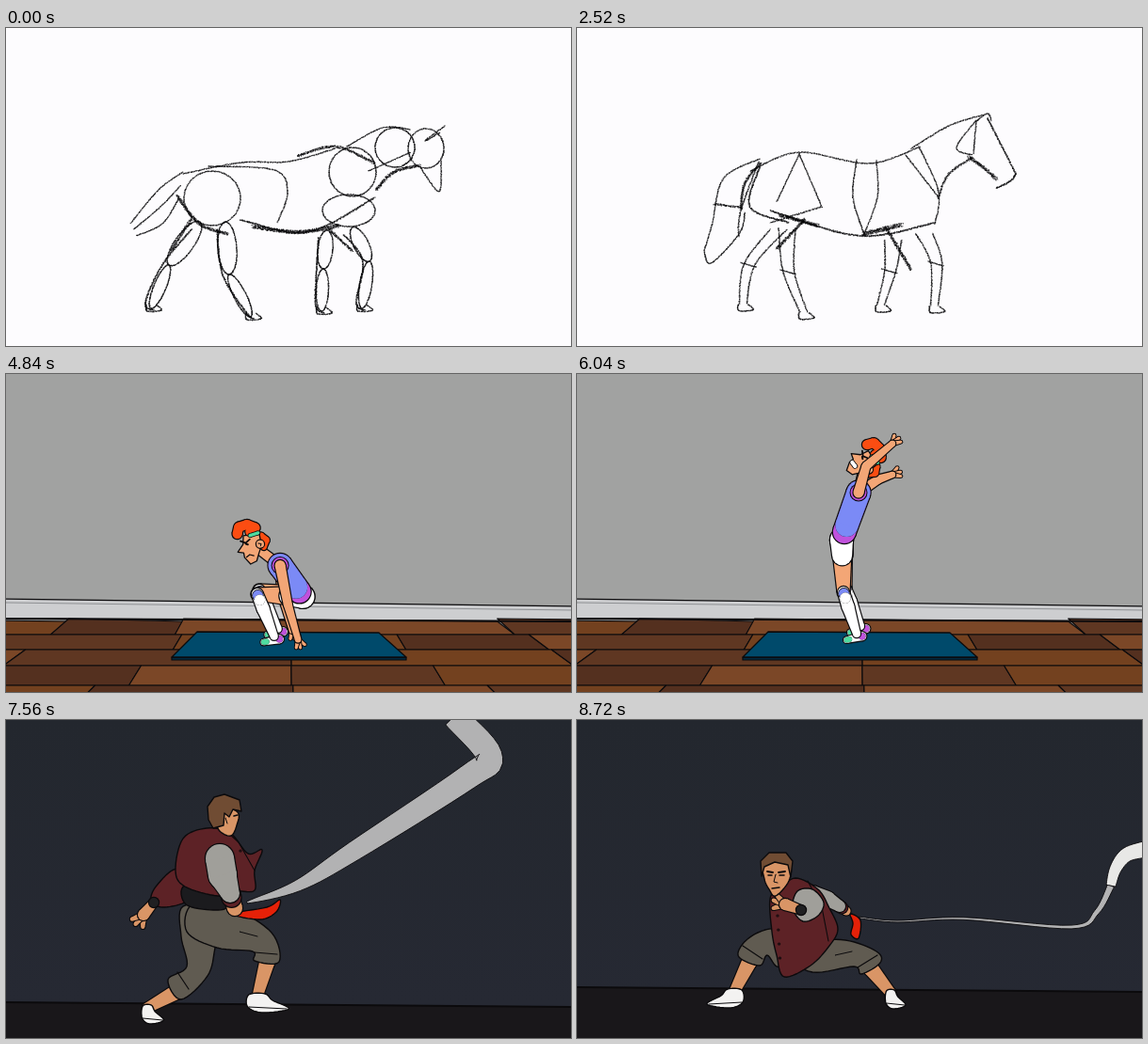
These frames come from a looping animation (600x338 px, 8760 ms). An HTML page with a canvas:

```html
<!DOCTYPE html>
<html lang="en">
<head>
<meta charset="utf-8">
<title>Animation reel</title>
<style>
html, body { margin: 0; width: 100%; height: 100%; overflow: hidden; background: #fdfcfe; }
canvas { display: block; width: 100%; height: 100%; }
</style>
</head>
<body>
<canvas id="stage" width="600" height="338"></canvas>
<script>
const ctx = document.getElementById('stage').getContext('2d');
const LOOP = 8760, YOGA_START = 2800, FIGHT_START = 6600;
const INK = '#0b0a0c';
const lerp = (a, b, s) => a + (b - a) * s;
const clamp = (v, lo = 0, hi = 1) => Math.max(lo, Math.min(hi, v));
const ease = s => (s = clamp(s), s * s * (3 - 2 * s));
const mix = (a, b, s) => a.map((v, i) => lerp(v, b[i], s));
const pairs = flat => flat.reduce((out, v, i) => (i % 2 ? out[out.length - 1].push(v) : out.push([v]), out), []);

function random(seed) {
  let s = seed * 7919 + 17;
  return () => (s = (s * 16807 + 11) % 2147483647) / 2147483647;
}

// Catmull-Rom samples through the given points.
function spline(p, closed, n = 8) {
  const m = p.length, out = [];
  const at = i => p[closed ? (i + m) % m : clamp(i, 0, m - 1)];
  for (let i = 0; i < (closed ? m : m - 1); i++) {
    const [a, b, c, d] = [at(i - 1), at(i), at(i + 1), at(i + 2)];
    for (let j = 0; j < n; j++) {
      const s = j / n;
      out.push([0, 1].map(k => b[k] + .5 * s * (c[k] - a[k] + s * (2 * a[k] - 5 * b[k] + 4 * c[k] - d[k] + s * (3 * (b[k] - c[k]) + d[k] - a[k])))));
    }
  }
  out.push(closed ? p[0] : p[m - 1]);
  return out;
}

function trace(points) {
  ctx.beginPath();
  points.forEach(p => ctx.lineTo(...p));
}

function shape(flat, fill, width = 1.4, curved = true) {
  const p = pairs(flat);
  trace(curved ? spline(p, true) : p);
  ctx.closePath();
  ctx.fillStyle = fill;
  ctx.fill();
  line(null, INK, width);
}

function line(flat, color = INK, width = 1.3) {
  if (flat) trace(pairs(flat));
  ctx.strokeStyle = color;
  ctx.lineWidth = width;
  ctx.stroke();
}

// A tapered, outlined chain of rounded segments.
function limb(points, radii, color, outline = 1.2) {
  for (const [fill, grow] of [[INK, outline], [color, 0]]) {
    ctx.fillStyle = fill;
    points.forEach(([x, y], i) => {
      const r = radii[i] + grow;
      ctx.beginPath();
      ctx.arc(x, y, r, 0, 7);
      ctx.fill();
      if (!i) return;
      const [px, py] = points[i - 1], pr = radii[i - 1] + grow;
      const a = Math.atan2(y - py, x - px), nx = -Math.sin(a), ny = Math.cos(a);
      trace([[px + nx * pr, py + ny * pr], [x + nx * r, y + ny * r], [x - nx * r, y - ny * r], [px - nx * pr, py - ny * pr]]);
      ctx.fill();
    });
  }
}

function hand(from, at, size, color) {
  const a = Math.atan2(at[1] - from[1], at[0] - from[0]);
  for (const turn of [-.65, 0, .5]) {
    limb([at, [at[0] + Math.cos(a + turn) * size, at[1] + Math.sin(a + turn) * size]], [size * .28, size * .16], color, 1);
  }
}

// ---- Horse: each stroke is [weight, x, y, ...] ----
const ROUGH = [
  [1, 188,155, 250,143, 300,142, 350,128],
  [1, 215,147, 285,151, 299,175, 288,207],
  [2.4, 310,136, 350,126, 392,144],
  [1.5, 249,204, 320,217, 392,180],
  [3.8, 262,211, 310,217, 354,210],
  [.8, 362,126, 400,106, 430,108],
  [1, 440,148, 460,174, 462,141],
  [1, 466,104, 445,120, 461,111],
  [2.8, 393,172, 412,153, 440,146],
  [.7, 385,152, 430,132],
  [2.8, 182,178, 205,208, 236,219],
  [2.6, 197,203, 175,237],
  [2.4, 343,214, 368,237]
];
const ROUNDS = [[219,181,30,29], [368,153,25,26], [446,128,19,21], [364,194,28,17], [413,127,21,21]];
const FRONT = [
  [1.1, 355,128, 395,104, 432,92],
  [1.4, 436,96, 466,155],
  [1.4, 466,155, 460,163, 445,170],
  [3, 416,137, 430,147, 446,161],
  [.8, 424,98, 403,127, 420,135],
  [1, 424,99, 421,134],
  [1.1, 424,99, 436,91, 440,99],
  [2, 420,138, 395,155, 383,181],
  [1, 349,135, 384,180],
  [1, 363,126, 384,174, 380,209],
  [4.2, 304,219, 345,209],
  [2.8, 328,212, 355,257]
];
const REAR = [
  [1.1, 185,152, 235,132, 310,144, 365,126],
  [1, 297,140, 293,180, 305,219],
  [1, 318,141, 319,180, 304,221],
  [1.4, 194,148, 184,190, 225,207],
  [2.2, 195,144, 179,165, 175,194],
  [.8, 236,134, 212,185],
  [.8, 236,134, 260,190],
  [1.3, 260,190, 205,207],
  [1.5, 205,194, 300,221, 380,207],
  [3.4, 216,199, 256,210],
  [2.8, 242,203, 212,235]
];
const TAIL = [
  [.9, 194,139, 158,160, 147,208, 139,237],
  [.9, 139,237, 146,250, 174,218, 179,196],
  [1.2, 193,142, 175,195, 173,222],
  [1.8, 149,187, 176,191]
];
// Leg keys: hip, joint and hoof at four points of the stride.
const STRIDE = [.08, .41, .58, .91];
const HIND = [[233,206,237,262,260,307], [194,202,189,250,184,304], [206,206,173,252,154,298], [238,206,213,250,242,296]];
const FORE = [[341,215,337,256,335,301], [320,224,320,264,285,292], [368,212,386,248,378,298], [371,206,369,256,384,304]];

function legAt(keys, phase) {
  phase = (phase - STRIDE[0] + 2) % 1 + STRIDE[0];
  let i = 3;
  while (i && phase < STRIDE[i] - 1e-6) i--;
  const end = i < 3 ? STRIDE[i + 1] : STRIDE[0] + 1;
  return mix(keys[i], keys[(i + 1) % 4], (phase - STRIDE[i]) / (end - STRIDE[i]));
}

function ring(x, y, rx, ry, turn = 0) {
  return Array.from({ length: 10 }, (_, i) => {
    const a = i * Math.PI / 5, u = rx * Math.cos(a), v = ry * Math.sin(a);
    return [x + u * Math.cos(turn) - v * Math.sin(turn), y + u * Math.sin(turn) + v * Math.cos(turn)];
  });
}

function horse(k) {
  const rnd = random(k + 3), early = k < 12;
  const step = early ? k : k - 16;
  const beat = Math.sin(step * Math.PI / 3), sway = Math.sin(step * Math.PI / 6) * 4;
  const bend = ([x, y]) => [x + (x < 190 ? sway * (190 - x) / 50 : 0), y + beat * (x > 330 ? (x - 330) / 25 : .4)];

  function pencil(weight, points, closed) {
    const p = spline(points, closed);
    for (let i = 1; i < p.length; i++) {
      const [a, b] = [p[i - 1], p[i]], steps = Math.ceil(Math.hypot(b[0] - a[0], b[1] - a[1]) / .8);
      for (let j = 0; j < steps; j++) {
        for (let n = 0; n < weight * 1.5; n++) {
          ctx.fillStyle = `rgba(8,8,10,${.25 + rnd() * .65})`;
          ctx.fillRect(lerp(a[0], b[0], j / steps) + (rnd() - .5) * weight - .5, lerp(a[1], b[1], j / steps) + (rnd() - .5) * weight - .5, 1, 1);
        }
      }
    }
  }

  function leg(keys, phase, hind) {
    const [top, joint, foot] = pairs(legAt(keys, phase));
    if (early) {
      [[top, joint, hind ? 10 : 8], [joint, foot, 6.5]].forEach(([a, b, r]) =>
        pencil(.9, ring((a[0] + b[0]) / 2, (a[1] + b[1]) / 2, Math.hypot(b[0] - a[0], b[1] - a[1]) / 2, r, Math.atan2(b[1] - a[1], b[0] - a[0])), true));
      pencil(1.5, [[top[0] - 9, top[1] + 8], [joint[0] - 7, joint[1]], [foot[0] - 6, foot[1] - 6], [foot[0] + 3, foot[1] + 2]]);
    } else {
      for (const side of [-1, 1]) {
        pencil(1.1, [[top[0] + side * 9, top[1] + 8], [joint[0] + side * 6, joint[1]], [foot[0] + side * 4, foot[1] - 4]]);
      }
      pencil(.8, [[joint[0] - 9, joint[1] - 2], [joint[0] + 8, joint[1] + 3]]);
    }
    pencil(1, [[foot[0] - 5, foot[1] - 4], [foot[0] - 4, foot[1] + 3], [foot[0] + 11, foot[1] + 2], [foot[0] + 5, foot[1] - 4]]);
  }

  ctx.fillStyle = '#fdfcfe';
  ctx.fillRect(0, 0, 600, 338);
  for (const half of [0, .5]) {
    leg(HIND, k / 12 + .08 + half, true);
    leg(FORE, k / 12 + .08 + half, false);
  }
  const strokes = early ? ROUGH : [...FRONT, ...REAR, ...TAIL];
  for (const [weight, ...flat] of strokes) pencil(weight, pairs(flat).map(bend));
  if (early) {
    for (const round of ROUNDS) pencil(1, ring(...round).map(bend), true);
    for (const s of [0, .5, 1]) pencil(.8, pairs(mix([188,153, 162,172, 132,208], [183,182, 166,208, 138,221], s)).map(bend));
  }
}

// ---- Yoga ----
const SKIN = '#f3a676', HAIR = '#fb4d12', BLUE = '#7b8af6', PURPLE = '#c052dc', GREEN = '#4fdca0';
// body: hip, shoulder, head; near, far: elbow, hand; leg: knee, ankle; turns: head tilt, foot direction
const LYING = { time: 2800, body: [303,282, 349,262, 342,225], near: [360,296, 320,303], far: [316,246, 328,222], leg: [243,270, 197,292], turns: [.15, -1.8] };
const PROPPED = { time: 3360, body: [303,281, 343,256, 332,216], near: [355,292, 311,302], far: [303,235, 320,212], leg: [243,270, 197,291], turns: [0, -1.8] };
const SITTING = { time: 3900, body: [302,280, 322,241, 305,205], near: [326,272, 332,300], far: [298,258, 272,262], leg: [251,248, 222,285], turns: [-.2, -2.5] };
const SQUAT = { time: 4760, body: [317,240, 291,208, 258,185], near: [299,250, 311,288], far: [293,240, 305,278], leg: [266,234, 284,279], turns: [-.2, -3.33] };
const STANDING = { time: 5320, body: [289,180, 293,126, 287,88], near: [303,155, 295,185], far: [298,152, 286,182], leg: [282,233, 297,276], turns: [0, -3.38] };
const REACHING = { time: 5600, body: [285,178, 297,126, 299,90], near: [301,86, 303,38], far: [311,90, 315,45], leg: [282,233, 297,276], turns: [.35, -3.38] };
const ARCHED = { time: 6040, body: [281,176, 299,126, 306,92], near: [307,98, 335,74], far: [320,112, 335,107], leg: [283,232, 297,276], turns: [.9, -3.38] };
const POSES = [LYING, PROPPED, SITTING, SQUAT, STANDING, REACHING, ARCHED];

function room() {
  ctx.fillStyle = '#a1a2a1';
  ctx.fillRect(0, 0, 600, 338);
  shape([-2,239, 602,247, 602,263, -2,260], '#cdced0', 1.3, false);
  line([0,243, 600,251], '#8e9093', 1);
  const rows = [260, 277, 293, 310, 331, 348];
  const joints = [[57, 184, 531], [182, 420, 566], [9, 303, 591], [137, 303, 460], [86, 305, 520]];
  const browns = ['#73411f', '#54301f', '#7b4727', '#5f3722'];
  joints.forEach((cuts, row) => {
    const y = rows[row], bottom = rows[row + 1], edges = [-200, ...cuts, 800];
    edges.slice(1).forEach((right, i) => {
      const left = edges[i], slope = x => (x - 300) * .04;
      shape([left - slope(left), y, right - slope(right), y + (row ? 0 : 3), right + slope(right), bottom, left + slope(left), bottom], browns[(i + row * 3) % 4], 1.2, false);
    });
  });
  line([0,260, 600,263], INK, 1.8);
  shape([176,301, 425,301, 425,304, 176,304], '#02293e', 1.2, false);
  shape([203,274, 396,275, 425,301, 176,301], '#004a6b', 1.3, false);
}

function yogaHead(x, y, tilt) {
  ctx.save();
  ctx.translate(x, y);
  ctx.rotate(tilt);
  limb([[12, -5], [17, 0], [13, 7]], [4, 3.5, 3], HAIR);
  shape([-6,-9, -8,0, -15,7, -9,9, -9,14, -4,22, 3,20, 7,12, 11,5, 11,-8], SKIN, 1.3, false);
  limb([[-12, -12], [-9, -19], [0, -20], [8, -15], [1, -12]], [5, 5, 5, 5, 4], HAIR);
  limb([[1, -8], [10, -9]], [1.7, 1.7], GREEN, .8);
  limb([[10, 3]], [4], SKIN);
  line([8,2, 11,3, 10,5], INK, 1);
  line([-10,-4, -5,-1, 0,-4], INK, 1.8);
  line([-5,0, -3,1], INK, 2);
  if (tilt > .3) limb([[-7, 12], [-2, 12]], [2, 2], '#fff', .8);
  else line([-7,14, -3,12, 1,14], INK, 1.2);
  ctx.restore();
}

function yogaLeg(hip, knee, ankle, turn) {
  const d = [Math.cos(turn), Math.sin(turn)], sole = [d[1] * 4, -d[0] * 4];
  const on = s => [ankle[0] + sole[0] + d[0] * s, ankle[1] + sole[1] + d[1] * s];
  limb([hip, knee], [11, 6.5], SKIN);
  limb([on(-5), on(12)], [4.5, 3.2], '#fff');
  limb([on(-5)], [3.7], PURPLE, 0);
  limb([on(9), on(12)], [3, 2.7], GREEN, 0);
  limb([knee, mix(knee, ankle, .35), ankle], [6, 6.5, 4], '#fff');
  limb([mix(knee, ankle, .03)], [5.5], BLUE, .7);
  limb([mix(knee, ankle, .14)], [5.8], '#fff', 0);
  limb([hip, mix(hip, knee, .3)], [12, 10.5], '#fff');
}

function yoga(t) {
  room();
  let i = 0;
  while (i < POSES.length - 2 && t >= POSES[i + 1].time) i++;
  const [a, b] = [POSES[i], POSES[i + 1]], s = ease((t - a.time) / (b.time - a.time));
  const joints = name => pairs(mix(a[name], b[name], s));
  const [hip, shoulder, head] = joints('body'), [knee, ankle] = joints('leg');
  const [tilt, foot] = mix(a.turns, b.turns, s);
  const arm = ([elbow, wrist]) => {
    hand(elbow, wrist, 9, SKIN);
    limb([shoulder, elbow, wrist], [5.5, 4.5, 3.2], SKIN);
  };
  const overFace = t < 3800;
  if (!overFace) arm(joints('far'));
  yogaLeg(hip, [knee[0] + 2, knee[1] - 4], [ankle[0] + 4, ankle[1] - 8], foot);
  yogaLeg(hip, knee, ankle, foot);
  limb([shoulder, mix(shoulder, head, .75)], [5, 4.5], SKIN);
  limb([shoulder, mix(shoulder, hip, .84)], [12.5, 12], PURPLE);
  limb([shoulder, mix(shoulder, hip, .7)], [12.5, 12], BLUE, 0);
  yogaHead(...head, tilt);
  if (overFace) arm(joints('far'));
  limb([shoulder], [8.5], PURPLE, 1);
  arm(joints('near'));
}

// ---- Fighter ----
const MAROON = '#5d2226', SLEEVE = '#a09f9a', CLOTH = '#605b51', TAN = '#d99566', BROWN = '#704c33';

function ribbon(points, width, color) {
  const p = spline(points), last = p.length - 1;
  const edge = side => p.map(([x, y], i) => {
    const a = p[Math.max(0, i - 1)], b = p[Math.min(last, i + 1)];
    const d = Math.hypot(b[0] - a[0], b[1] - a[1]) || 1, r = side * width(i / last);
    return [x - (b[1] - a[1]) / d * r, y + (b[0] - a[0]) / d * r];
  });
  trace([...edge(1), ...edge(-1).reverse()]);
  ctx.closePath();
  ctx.fillStyle = color;
  ctx.fill();
  line(null, INK, .9);
}

function fighterHead(low) {
  if (low) {
    shape([199,153, 225,153, 225,171, 211,187, 204,180, 199,169], TAN);
    shape([196,166, 195,150, 204,141, 222,141, 229,150, 227,167, 224,154, 210,151, 199,156], BROWN, 1.4, false);
    line([202,161, 208,162], INK, 1.8);
    line([214,162, 221,161], INK, 1.8);
    line([203,165, 207,165], INK, 1.5);
    line([215,165, 220,165], INK, 1.5);
    line([211,164, 209,172, 213,173], INK, 1);
    line([207,179, 215,178], INK, 1.4);
  } else {
    shape([226,92, 246,98, 245,112, 239,123, 228,119, 224,110], TAN);
    shape([214,92, 221,82, 232,79, 248,85, 250,97, 241,95, 237,103, 232,99, 231,112, 220,115, 215,106], BROWN, 1.4, false);
    line([242,102, 246,101], INK, 1.6);
    line([233,104, 235,110], INK, 1);
  }
}

function shoe([x, y], facing) {
  shape([-9,11, -8,-2, 7,-3, 14,4, 29,13, 5,17].map((v, i) => i % 2 ? y + v : x + v * facing), '#f3f2f1');
  line([x - 8 * facing, y + 11, x + 27 * facing, y + 13], INK, 1);
}

// Everything blends from a lunge to a low stance.
function fighter(t) {
  const m = ease((t - 7840) / 640), low = m > .5;
  const blend = (lunge, stance) => mix(lunge, stance, m);
  const horizon = lerp(300, 284, m);
  const wall = ctx.createLinearGradient(0, 0, 0, 300);
  wall.addColorStop(0, '#23272e');
  wall.addColorStop(1, '#262933');
  ctx.fillStyle = wall;
  ctx.fillRect(0, 0, 600, 338);
  shape([-5,horizon, 605,horizon + 5, 605,345, -5,345], '#19171a', 2, false);

  ctx.save();
  const approach = clamp((7560 - t) / 960);
  ctx.translate(-40 * approach * approach, 0);

  // The whip sweeps around the hand before it settles.
  const whip = pairs(blend([256,194, 310,176, 370,139, 490,61, 513,38, 476,-4], [300,210, 340,214, 410,211, 525,220, 552,204, 567,176]));
  const [hx, hy] = whip[0];
  ctx.save();
  ctx.translate(hx, hy);
  ctx.rotate((t - 7560) / 620 * (1 - m));
  ctx.translate(-hx, -hy);
  ribbon(whip, s => lerp(1 + 13 * Math.sin(2 * s), .8 + 3 * s * s, m), '#b2b2b3');
  if (m > .7) ribbon([[567, 176], [572, 158], [584, 143], [606, 137]], s => 5 + 4 * s, '#e8e8e6');
  ctx.restore();

  const weaponArm = () => {
    const [shoulder, elbow, cuff, fist] = pairs(blend([227,147, 230,165, 238,184, 243,200], [250,185, 266,190, 279,198, 286,203]));
    const [r0, r1, r2, r3] = blend([15, 15, 10, 8], [9, 8, 6, 4.5]);
    shape(blend([240,206, 277,199, 291,191, 287,204, 270,212], [290,206, 301,213, 299,232, 291,228, 293,216]), '#e52108');
    limb([fist, mix(fist, cuff, .4)], [r3, r3], TAN);
    limb([cuff, mix(cuff, fist, .3)], [r2, r2], MAROON);
    limb([shoulder, elbow, cuff], [r0, r1, r2], SLEEVE);
  };
  const freeArm = () => {
    shape(blend([183,158, 160,176, 154,192, 166,199, 190,194, 210,180], [250,180, 234,182, 229,200, 240,214, 256,208, 262,194]), low ? SLEEVE : MAROON);
    const [wrist, palm] = pairs(blend([157,194, 146,207], [238,202, 221,196]));
    hand(wrist, palm, 13, TAN);
    limb([wrist, palm], [4.5, 6], TAN);
    limb([wrist], [5], '#202022');
  };
  const lowerLeg = (lunge, stance, facing) => {
    const [shin, ankle] = pairs(blend(lunge, stance));
    limb([shin, ankle], [8, 5.5], TAN);
    shoe(ankle, facing);
  };

  if (low) weaponArm(); else freeArm();
  lowerLeg([181,289, 150,306], [183,257, 167,289], lerp(.6, -1, m));
  lowerLeg([277,258, 267,294], [312,264, 333,290], lerp(1.15, .55, m));
  shape(blend([188,198, 186,230, 192,262, 172,276, 186,297, 214,272, 222,242, 228,202], [212,222, 192,226, 176,238, 172,252, 194,261, 202,250, 215,262, 235,232]), CLOTH);
  shape(blend([198,196, 240,200, 282,226, 290,257, 264,256, 262,246, 224,242, 192,225], [245,236, 285,234, 318,246, 322,258, 302,270, 294,262, 250,268, 222,250]), CLOTH);
  line(blend([182,268, 194,286], [176,240, 197,254]), INK, 1.2);
  line(blend([264,247, 288,249], [298,263, 319,250]), INK, 1.2);
  line(blend([248,225, 267,230], [274,250, 292,246]), INK, 1);
  if (!low) shape([190,176, 191,196, 220,202, 236,198, 232,180], '#1b1b1e');
  shape(blend(
    [213,115, 188,126, 180,160, 190,177, 225,187, 245,182, 264,181, 264,160, 272,138, 257,142, 238,120],
    [215,180, 205,190, 207,225, 212,250, 220,273, 248,261, 268,240, 277,222, 268,200, 256,180, 232,168]), MAROON);
  line(blend([236,120, 247,130, 264,160], [245,171, 260,199, 267,235]), INK, 1.1);
  if (low) for (let y = 208; y < 260; y += 15) limb([[213 + (y - 208) / 18, y]], [1], '#2a1013', .6);
  else limb([[249, 139]], [1], '#2a1013', .6);
  if (low) freeArm(); else weaponArm();
  const shift = low ? m - 1 : m;
  ctx.translate(-20 * shift, 64 * shift);
  fighterHead(low);
  ctx.restore();
}

ctx.lineJoin = ctx.lineCap = 'round';
let shown = -1;
function render() {
  const t = Math.floor(performance.now() % LOOP / 40) * 40;
  if (t !== shown) {
    shown = t;
    if (t < YOGA_START) horse(Math.floor((t + 28) / 101));
    else if (t < FIGHT_START) yoga(t);
    else fighter(t);
  }
  requestAnimationFrame(render);
}
render();
</script>
</body>
</html>
```
